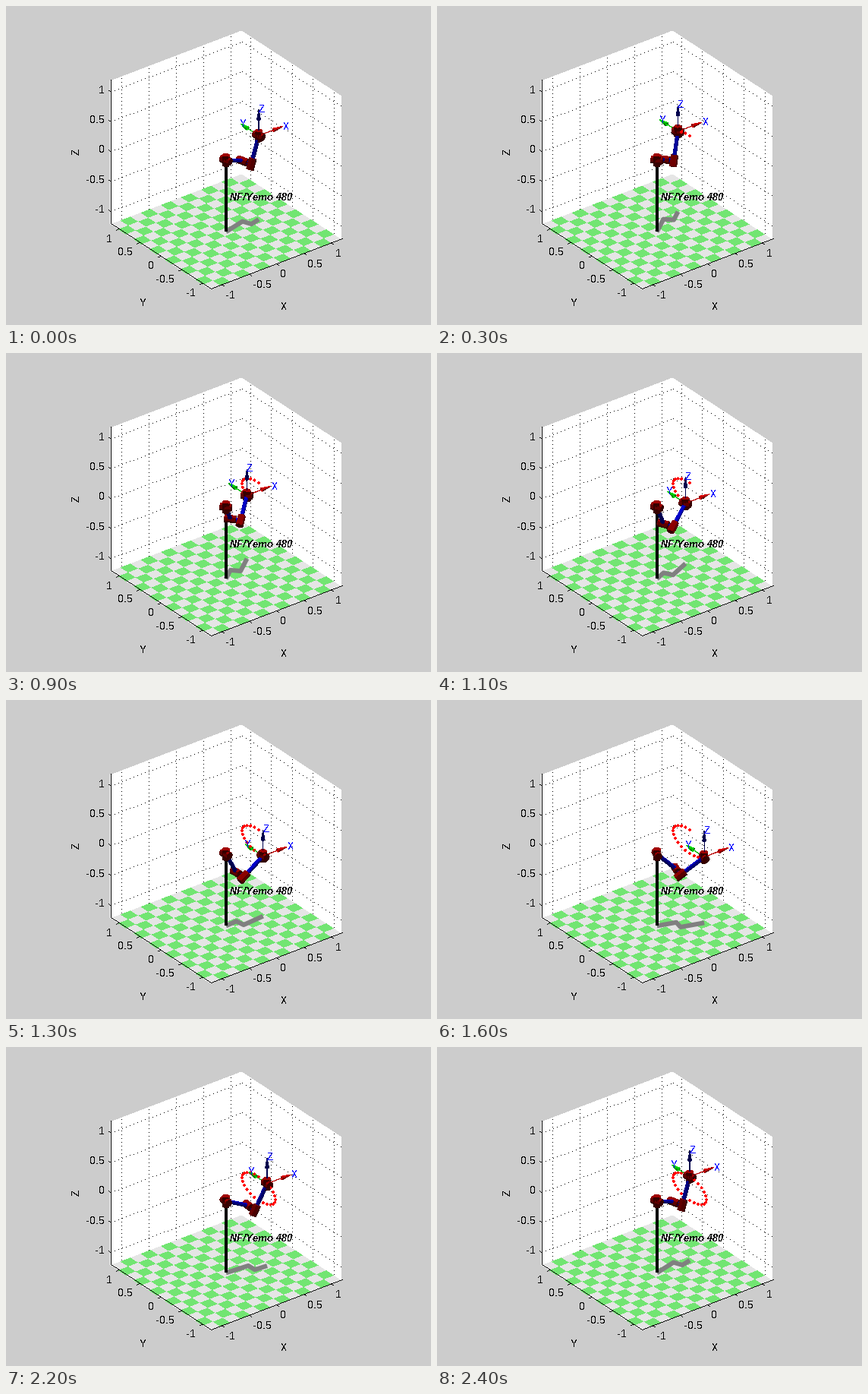
A matplotlib script for the animation above (2.5 s loop, 560 by 420 pixels).

```python
import numpy as np
import matplotlib.pyplot as plt
from matplotlib.animation import FuncAnimation
from matplotlib.collections import PolyCollection

W, H, DPI = 560, 420, 100
FRAMES, INTERVAL = 25, 100
PT = 72 / DPI
LIM, TILES = 1.2, 13
TICKS = np.arange(-1, 1.01, 0.5)

# screen vectors of the unit axes, and the direction towards the viewer
ORIGIN = np.array([289.3, 202.4])
PROJ = np.array([[72.08, -27.5], [-55.0, -35.83], [0, -78.75]])
EYE = np.array([-0.527, -0.687, 0.5])
UP = np.array([0.0, 0.0, 1.0])

# arm dimensions
A2, A3, D3, D4 = 0.4318, 0.0203, 0.15005, 0.4318

RED, BLUE = (0.7, 0, 0), (0, 0, 1)

plt.rcParams.update({
    "font.family": "Liberation Sans",
    "font.size": 14 * PT,
    "text.antialiased": False,
    "text.hinting": "native",
    "text.hinting_factor": 1,
})


def px(p):
    return ORIGIN + np.asarray(p, float) @ PROJ


def lit(color, normal):
    return tuple(np.array(color) * (0.3 + 0.6 * max(0.0, normal @ UP)))


def basis(axis):
    side = np.cross(axis, UP if abs(axis[2]) < 0.9 else np.array([1.0, 0, 0]))
    side = side / np.linalg.norm(side)
    return side, np.cross(axis, side)


def add_face(out, pts, color, normal, two_sided=False):
    if normal @ EYE < 0:
        if not two_sided:
            return
        normal = -normal
    pts = np.array(pts)
    out.append((pts.mean(0) @ EYE, px(pts), lit(color, normal)))


def add_tube(out, a, b, r0, color, r1=None, sides=8, parts=4):
    """Lit prism from a to b, or an open cone when r1 is given."""
    cone = r1 is not None
    r1 = r1 if cone else r0
    axis = (b - a) / np.linalg.norm(b - a)
    u, v = basis(axis)
    ang = np.linspace(0, 2 * np.pi, sides + 1)
    ring = np.outer(np.cos(ang), u) + np.outer(np.sin(ang), v)
    cuts = np.linspace(0, 1, parts + 1)
    for e, f in zip(ring[:-1], ring[1:]):
        normal = (e + f) / np.linalg.norm(e + f)
        for s, t in zip(cuts[:-1], cuts[1:]):
            p, q = a + (b - a) * s, a + (b - a) * t
            rp, rq = r0 + (r1 - r0) * s, r0 + (r1 - r0) * t
            add_face(out, [p + rp * e, p + rp * f, q + rq * f, q + rq * e],
                     color, normal, cone)
        if not cone:
            add_face(out, [a, a + r0 * e, a + r0 * f], color, -axis)
            add_face(out, [b, b + r1 * e, b + r1 * f], color, axis)


def add_joint(out, p, axis):
    add_tube(out, p - 0.08 * axis, p + 0.08 * axis, 0.053, RED)


def add_dot(out, p):
    shape = np.array([[-1.6, 0], [0, -1.6], [1.6, 0], [0, 1.6]])
    out.append((p @ EYE, px(p) + shape, (1, 0, 0)))


def add_arrow(out, p, axis, color):
    add_tube(out, p, p + 0.3 * axis, 0.001, color, sides=4, parts=6)
    add_tube(out, p + 0.27 * axis, p + 0.43 * axis, 0.026, color, 0.001,
             sides=10, parts=2)


def tool(k):
    t = 2 * np.pi * k / (FRAMES - 1)
    return np.array([0.6, 0.4 * np.sin(t), 0.2 * np.cos(t)])


def solve(wrist):
    """Elbow-down pose: elbow points, forearm direction and plane normal."""
    x, y, z = wrist
    r = np.hypot(x, y)
    turn = np.arctan2(y, x) + np.arcsin(D3 / r)
    ahead = np.array([np.cos(turn), np.sin(turn), 0])
    normal = np.array([np.sin(turn), -np.cos(turn), 0])
    reach = np.sqrt(r * r - D3 * D3)
    dist, fore = np.hypot(reach, z), np.hypot(A3, D4)
    bend = np.arccos((A2**2 + dist**2 - fore**2) / (2 * A2 * dist))
    lift = np.arctan2(z, reach) - bend
    upper = A2 * (np.cos(lift) * ahead + np.sin(lift) * UP)
    q = (np.arctan2(z - upper[2], reach - A2 * np.cos(lift))
         - np.arctan2(D4, A3))
    elbow = upper + D3 * normal + A3 * (np.cos(q) * ahead + np.sin(q) * UP)
    along = -np.sin(q) * ahead + np.cos(q) * UP
    return upper, elbow, along, normal


fig = plt.figure(figsize=(W / DPI, H / DPI), dpi=DPI, facecolor="#cccccc")
ax = fig.add_axes([0, 0, 1, 1])
ax.axis("off")


def plane(corner, u, v):
    """Position of every pixel on a parallelogram, and which lie inside."""
    grid = np.stack(np.meshgrid(np.arange(W), np.arange(H)), axis=-1)
    sides = 2 * LIM * np.array([u, v]) @ PROJ
    st = (grid - px(corner)) @ np.linalg.inv(sides)
    return st, ((st >= 0) & (st < 1)).all(axis=-1)


def line(a, b, step=1):
    """Crisp one-pixel line; a larger step makes it dotted."""
    (x0, y0), (x1, y1) = px(a), px(b)
    n = max(abs(x1 - x0), abs(y1 - y0))
    t = np.arange(0, n + 0.5, step) / n
    ax.plot(np.round(x0 + (x1 - x0) * t), np.round(y0 + (y1 - y0) * t),
            ls="", marker=",", color="k", zorder=3)


def label(x, y, text, **kw):
    kw = {"ha": "center", "va": "center_baseline", "zorder": 20, **kw}
    return ax.text(x, y - 1, text, **kw)


def draw_room():
    lo, hi = -LIM, LIM
    x_dir, y_dir, z_dir = np.eye(3)

    room = np.full((H, W, 3), 0.8)
    for corner, side in [((lo, hi, lo), x_dir), ((hi, lo, lo), y_dir)]:
        room[plane(corner, side, z_dir)[1]] = 1
    st, floor = plane((lo, lo, lo), x_dir, y_dir)
    green = np.floor(st * TILES).sum(axis=-1) % 2 == 1
    room[floor] = 0.9
    room[floor & green] = (0.45, 0.9, 0.45)
    ax.imshow(room, extent=(-0.5, W - 0.5, H - 0.5, -0.5), aspect="auto",
              interpolation="nearest", zorder=0)

    for t in TICKS:
        line((t, hi, lo), (t, hi, hi), 5)
        line((hi, t, lo), (hi, t, hi), 5)
        line((lo, hi, t), (hi, hi, t), 5)
        line((hi, hi, t), (hi, lo, t), 5)

    line((lo, hi, hi), (lo, hi, lo))
    line((lo, hi, lo), (lo, lo, lo))
    line((lo, lo, lo), (hi, lo, lo))
    for t in TICKS:
        name = f"{t:g}"
        line((t, lo, lo), (t, lo - 0.06, lo))
        line((lo, t, lo), (lo - 0.05, t, lo))
        line((lo, hi, t), (lo, hi + 0.06, t))
        x, y = px((t, lo, lo))
        label(x + 6, y + 13, name, ha="left")
        x, y = px((lo, t, lo))
        label(x - 8, y + 12, name, ha="right")
        x, y = px((lo, hi, t))
        label(x - 7, y - 3.5, name, ha="right")

    label(365, 395.5, "X")
    label(180, 390.5, "Y")
    label(93, 193, "Z", rotation=90, va="center")
    label(294.3, 251.5, "NF/Yemo 480", ha="left", weight="bold",
          style="italic", size=13 * PT)
    x, y = px([(0, 0, 0), (0, 0, lo)]).T
    ax.plot(x, y, color="k", lw=4 * PT, zorder=5, solid_capstyle="butt")


draw_room()
shadow, = ax.plot([], [], color="#808080", lw=6 * PT, zorder=4,
                  solid_capstyle="butt", solid_joinstyle="round")
arm = ax.add_collection(PolyCollection([], edgecolors="none",
                                       antialiased=False, zorder=10))
axis_names = [label(0, 0, n, color="b", ha="left") for n in "XYZ"]
ax.set_xlim(-0.5, W - 0.5)
ax.set_ylim(H - 0.5, -0.5)


def draw(k):
    base, wrist = np.zeros(3), tool(k)
    upper, elbow, along, normal = solve(wrist)
    out = []

    for p, axis in [(base, UP), (base, normal), (upper, normal),
                    (elbow, along), (wrist, normal), (wrist, UP)]:
        add_joint(out, p, axis)
    for a, b in [(base, upper), (upper, elbow), (elbow, wrist)]:
        add_tube(out, a, b, 0.025, BLUE, parts=10)
    for axis, color, text in zip(np.eye(3), np.eye(3), axis_names):
        add_arrow(out, wrist, axis, color)
        text.set_position(px(wrist + 0.45 * axis) - (0.5, 0.5))
    for i in range(k + 1):
        add_dot(out, tool(i))

    out.sort(key=lambda face: face[0])
    arm.set_verts([face[1] for face in out])
    arm.set_facecolor([face[2] for face in out])

    ground = np.array([base, upper, elbow, wrist])
    ground[:, 2] = -LIM
    shadow.set_data(*px(ground).T)
    return [arm, shadow, *axis_names]


anim = FuncAnimation(fig, draw, frames=FRAMES, interval=INTERVAL,
                     repeat=True, repeat_delay=0, blit=False)
plt.show()
```
